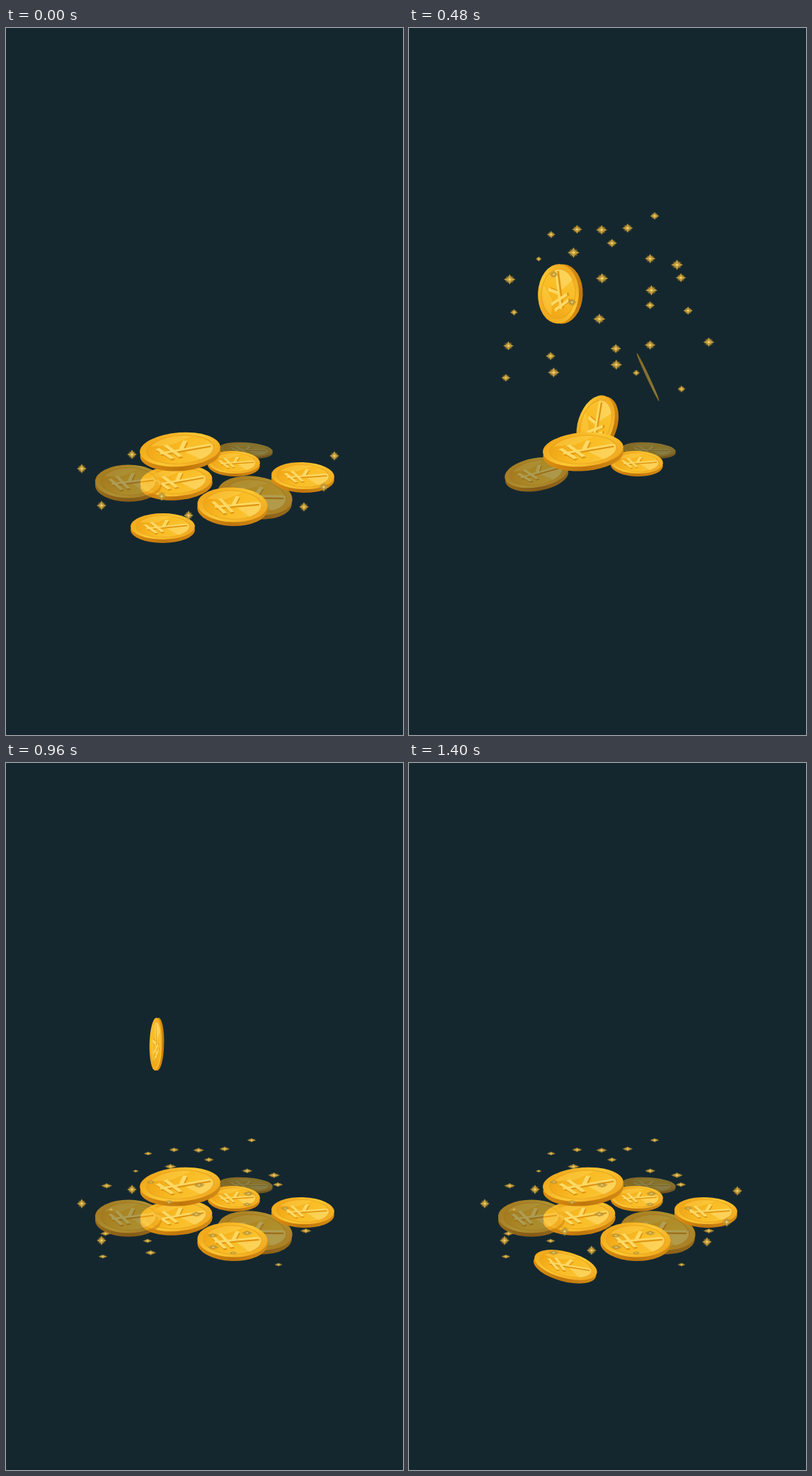
Recreate the animation shown at these times as an HTML page. Size 561 by 998 pixels, loop 1480 ms.

```html
<!DOCTYPE html>
<html lang="en">
<head>
<meta charset="utf-8">
<title>Falling coins</title>
<style>
html, body { margin: 0; width: 100%; height: 100%; overflow: hidden; background: #14272f; }
svg { display: block; width: 100vw; height: 100vh; }
</style>
</head>
<body>
<svg viewBox="0 0 561 998" preserveAspectRatio="none">
  <defs>
    <linearGradient id="gold" x1="0" y1="0.2" x2="1" y2="0.8">
      <stop offset="0" stop-color="#efa316"/>
      <stop offset="0.5" stop-color="#fcc833"/>
      <stop offset="1" stop-color="#f0a51c"/>
    </linearGradient>
    <linearGradient id="plate" x1="0" y1="0.3" x2="1" y2="0.7">
      <stop offset="0" stop-color="#f0a414"/>
      <stop offset="0.55" stop-color="#f9bd25"/>
      <stop offset="1" stop-color="#fac537"/>
    </linearGradient>
    <linearGradient id="rim">
      <stop offset="0" stop-color="#dd8f10"/>
      <stop offset="0.5" stop-color="#c0760c"/>
      <stop offset="1" stop-color="#d48c15"/>
    </linearGradient>
    <path id="yen" d="M-.5 .16L.02 .02L.14 -.5M.02 .02L.74 -.16M-.36 -.32L0 .42M-.56 -.14L-.2 .5"/>
    <g id="face">
      <circle r="1" fill="url(#gold)"/>
      <circle r=".83" fill="url(#plate)" stroke="#eba61f" stroke-width=".04"/>
      <path d="M.1 .12L.8 -.22A.83 .83 0 0 1 .5 .66Z" fill="#ffe27c" opacity=".5"/>
      <path d="M-.72 -.3A.8 .8 0 0 1 .3 -.74L-.2 -.3Z" fill="#ffd958" opacity=".4"/>
      <g fill="none" stroke-width=".11">
        <use href="#yen" stroke="#df9512" transform="translate(.02 .09)"/>
        <use href="#yen" stroke="#fdd964"/>
      </g>
    </g>
    <g id="star">
      <circle r=".8" fill="#a8842c" opacity=".35"/>
      <path d="M0 -1Q.15 -.25 1 0Q.15 .25 0 1Q-.15 .25 -1 0Q-.15 -.25 0 -1Z" fill="#c29c3a"/>
      <path d="M-.55 -.55L0 -.2L.55 -.55L.2 0L.55 .55L0 .2L-.55 .55L-.2 0Z" fill="#b8923a"/>
      <circle r=".24" fill="#efd064"/>
    </g>
  </defs>
  <rect width="561" height="998" fill="#14272f"/>
  <g id="coins"></g>
  <g id="sparks"></g>
</svg>
<script>
const LOOP = 1480;
const NS = "http://www.w3.org/2000/svg";
const mix = (a, b, k) => a + (b - a) * k;

function add(parent, tag, attrs) {
  const el = document.createElementNS(NS, tag);
  for (const k in attrs) el.setAttribute(k, attrs[k]);
  return parent.appendChild(el);
}

function show(el, on) {
  el.setAttribute("display", on ? "inline" : "none");
  return on;
}

// Frames tick every 80 ms, with a few longer or shorter holds
function hold(t) {
  if (t < 40) return LOOP; // the loop opens on the finished pile
  if (t < 280) return 40 + 80 * Math.floor((t - 40) / 80);
  if (t < 400) return 280;
  if (t < 600) return 400 + 80 * Math.floor((t - 400) / 80);
  if (t < 720) return 600;
  if (t < 1120) return 720 + 80 * Math.floor((t - 720) / 80);
  return t < 1240 ? 1120 : 1240 + 80 * Math.floor((t - 1240) / 80);
}

// A coin rests at x, y. It lands at `land`, comes from `dx` aside and
// is seen edge-on `edge` ms before it lands.
const coins = [];
const coinLayer = document.getElementById("coins");
function coin(x, y, rx, ry, opts) {
  const g = add(coinLayer, "g", {});
  const rim = add(g, "ellipse", { fill: "url(#rim)" });
  const face = add(g, "use", { href: "#face" });
  coins.push({ x, y, rx, ry, g, rim, face,
    rot: 0, lean: -90, edge: 190, speed: 1, alpha: 1, fade: 1, ...opts });
}

coin(339, 595, 38, 10, { rot: 4, land: 320, dx: -65, edge: -200, alpha: .5 });
coin(322, 613, 37, 16, { rot: 2, land: 220, dx: -20, fade: .6 });
coin(352, 660, 53, 27, { rot: 8, land: 960, dx: -58, speed: 1.5, alpha: .68 });
coin(419.5, 632, 44.5, 19, { rot: 2, land: 670, dx: -90, lean: 75, fade: .5 });
coin(320, 673, 49.5, 24.5, { rot: 2, land: 640, dx: -65, edge: 270 });
coin(240.5, 639, 51, 22, { rot: -4, land: 800, dx: -30 });
coin(173, 640, 47, 23.5, { land: 500, dx: 31, edge: 60, alpha: .66 });
coin(246, 595, 57, 24, { rot: -4, land: 200, dx: 12 });
coin(221.5, 703.5, 45.5, 18.5, { land: 1320, dx: -10, edge: 320 });

function drawCoin(c, t) {
  const p = Math.max(0, c.land - t);          // time left to fall
  const q = Math.max(0, t - c.land);          // time since landing
  const k = 1 - Math.exp(-p / 80);
  const sway = q < 160 ? Math.sin(Math.PI * q / 160) : 0;
  const y = c.y - c.speed * (.6 * p + .0007 * p * p) + 5 * sway;
  if (!show(c.g, y >= 300)) return;

  const rx = c.rx * (1 - .18 * k);
  const ry = mix(c.ry, rx * Math.abs(Math.sin((p - c.edge) / 170)), k);
  const rot = mix(c.rot, c.lean, k ** 1.5) + 15 * sway;
  c.g.setAttribute("transform", `translate(${c.x + c.dx * k} ${y}) rotate(${rot})`);
  c.g.setAttribute("opacity", c.alpha * (q < 100 ? c.fade : 1));
  c.rim.setAttribute("rx", rx);
  c.rim.setAttribute("ry", ry);
  c.rim.setAttribute("cy", c.rx * .11 * Math.min(1, ry / 15));
  c.face.setAttribute("transform", `scale(${rx} ${ry})`);
}

let seed = 7;
function rand() {
  seed = (seed * 16807) % 2147483647;
  return seed / 2147483647;
}

const sparkLayer = document.getElementById("sparks");
const star = () => add(sparkLayer, "use", { href: "#star" });
const place = (el, x, y, rx, ry) =>
  el.setAttribute("transform", `translate(${x} ${y}) scale(${rx} ${ry})`);

// Loose grid of falling sparks, narrower at the top
const ROWS = 6, COLS = 5;
const field = [];
for (let row = 0; row < ROWS; row++) {
  const half = Math.min(160, 80 + 45 * row);
  for (let col = 0; col < COLS; col++) {
    const u = (col + .15 + .7 * rand()) / COLS * 2 - 1;
    const drop = 40 * (row + .9 * rand());
    field.push({ x: 276 + half * u, drop, r: 3 + 6 * Math.sqrt(rand()), el: star() });
  }
}

// Sparks that stay around the pile, the left side lighting up first
const glints = [[107, 622], [135, 674], [178, 602], [220, 661],
  [258, 688], [421, 676], [464, 604], [449, 648]]
  .map(([x, y]) => ({ x, y, from: x < 200 ? 960 : 1400, el: star() }));

// The field sinks as one plane and flattens until it comes to rest
function drawSparks(t) {
  const d = Math.min(t, 960) - 600;
  const top = 332 + .61 * d - .0002 * d * d;
  const scale = 1 - .00063 * d;
  const flat = Math.min(.95, .75 * scale * scale);
  for (const s of field) {
    const y = top + scale * s.drop;
    if (show(s.el, y >= 262 && t < LOOP)) place(s.el, s.x, y, s.r, s.r * flat);
  }
  for (const g of glints) {
    if (show(g.el, t >= g.from)) place(g.el, g.x, g.y, 7, 7);
  }
}

function draw(time) {
  const t = hold(time);
  for (const c of coins) drawCoin(c, t);
  drawSparks(t);
}

const start = performance.now();
function tick() {
  draw((performance.now() - start) % LOOP);
  requestAnimationFrame(tick);
}
tick();
</script>
</body>
</html>
```
